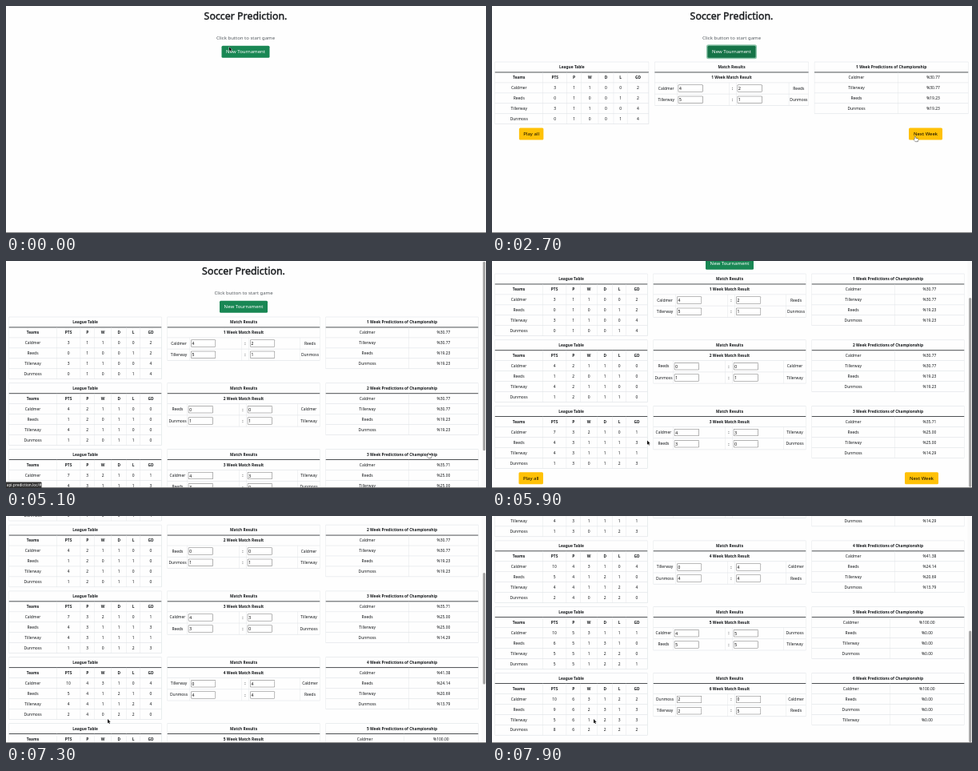
An HTML page with a canvas for the animation above (8000 ms loop, 600x284 px).

```html
<!DOCTYPE html>
<html lang="en">
<head>
<meta charset="utf-8">
<title>Soccer Prediction</title>
<style>
html, body { margin: 0; width: 100%; height: 100%; overflow: hidden; background: #fefefe; }
canvas { display: block; width: 600px; height: 284px; }
</style>
</head>
<body>
<canvas id="stage"></canvas>
<script>
const WIDTH = 600, HEIGHT = 284, VIEW = 283, LOOP = 8000;
const ROW = 12.95, WEEK_PITCH = 82.8, TABLE_TOP = 70;
const INK = '#212529', LINE = '#dee2e6';

const canvas = document.getElementById('stage');
const ctx = canvas.getContext('2d');
const dpr = window.devicePixelRatio || 1;
canvas.width = WIDTH * dpr;
canvas.height = HEIGHT * dpr;

const TEAMS = { C: 'Caldmer', R: 'Reeds', T: 'Tillerway', D: 'Dunmoss' };
const RESULTS = ['C42R T51D', 'R00C D11T', 'C43T R30D', 'T04C D44R', 'C45D R55T', 'D20C T25R'];
const HEADINGS = ['Teams', 'PTS', 'P', 'W', 'D', 'L', 'GD'];

// Play the whole season to obtain standings and title odds for each week.
function playSeason() {
  const table = Object.keys(TEAMS).map(id => ({ id, pts: 0, p: 0, w: 0, d: 0, l: 0, gd: 0 }));
  const record = (id, diff) => {
    const s = table.find(row => row.id === id);
    s.p++;
    s.gd = Math.abs(diff);
    if (diff > 0) { s.w++; s.pts += 3; }
    else if (diff < 0) s.l++;
    else { s.d++; s.pts++; }
  };
  return RESULTS.map((line, i) => {
    const matches = line.split(' ').map(([home, a, b, away]) => ({ home, a, b, away }));
    for (const m of matches) {
      record(m.home, m.a - m.b);
      record(m.away, m.b - m.a);
    }
    const left = 5 - i;
    const total = table.reduce((sum, s) => sum + s.pts + left, 0);
    const odds = [...table].sort((x, y) => y.pts - x.pts).map((s, rank) => {
      const chance = left < 2 ? (rank ? 0 : 100) : 100 * (s.pts + left) / total;
      return [TEAMS[s.id], '%' + chance.toFixed(2)];
    });
    const stats = table.map(s => [TEAMS[s.id], s.pts, s.p, s.w, s.d, s.l, s.gd]);
    return { matches, odds, stats };
  });
}
const season = playSeason();

// Glyphs are set large and scaled down so advances stay fractional.
const font = (size, weight) => `${weight} ${size * 10}px "Noto Sans", "Open Sans", sans-serif`;
function text(str, x, y, size = 4.95, { weight = 400, color = '#16191c', align = 'center', outline = 0 } = {}) {
  ctx.save();
  ctx.translate(x, y + size * 0.357);
  ctx.scale(0.1, 0.1);
  ctx.font = font(size, weight);
  ctx.textAlign = align;
  ctx.fillStyle = ctx.strokeStyle = color;
  ctx.fillText(str, 0, 0);
  if (outline) {
    ctx.lineWidth = outline * 10;
    ctx.strokeText(str, 0, 0);
  }
  ctx.restore();
}
const bold = (str, x, y) => text(str, x, y, 4.85, { weight: 700 });

// Columns share the table width in proportion to their widest cell.
function columnShares() {
  const measure = (str, size, weight) => {
    ctx.font = font(size, weight);
    return ctx.measureText(str).width / 10;
  };
  const widest = Math.max(...Object.values(TEAMS).map(name => measure(name, 4.95, 400)));
  const widths = HEADINGS.map((head, c) => 5 + (c ? measure(head, 4.85, 700) : widest));
  const total = widths.reduce((a, b) => a + b);
  return widths.map(w => w / total);
}
const shares = columnShares();

// Eased moves towards successive stops: [start, end, ...values].
function follow(origin, stops, t) {
  return stops.reduce((now, [start, end, ...goal]) => {
    const k = Math.min(1, Math.max(0, (t - start) / (end - start)));
    const eased = k * k * (3 - 2 * k);
    return now.map((v, i) => v + (goal[i] - v) * eased);
  }, origin);
}
const moveTo = (arrival, x, y, duration = 250) => [arrival - duration, arrival, x, y];
const POINTER = [
  moveTo(700, 322, 58, 700), moveTo(1500, 296.5, 97), moveTo(1900, 346, 135), moveTo(2300, 479, 166),
  moveTo(2600, 527, 163), moveTo(3700, 452, 181), moveTo(4300, 505, 227), moveTo(4800, 526, 240),
  moveTo(5900, 194, 224.5), moveTo(6200, 85.5, 273), moveTo(6500, 56, 268), moveTo(7200, 127, 254)
];
const SCROLL = [[5300, 5600, 54], [6650, 6700, 0], [6850, 7550, 200], [7600, 7900, 287.5]];
const WEEK_STARTS = [[1000, 1], [3000, 2], [4900, 3], [6700, 6]];
const HOVERS = [[0, 1400], [2600, 3400], [4700, 5300], [6400, 6800]];
const hovering = t => HOVERS.some(([from, to]) => t >= from && t < to);

function rect(x, y, w, h, color) {
  ctx.fillStyle = color;
  ctx.fillRect(x, y, w, h);
}
function rounded(x, y, w, h, r, fill) {
  ctx.beginPath();
  ctx.roundRect(x, y, w, h, r);
  ctx.fillStyle = fill;
  ctx.fill();
}
const hline = (x1, x2, y, color = LINE, size = 0.6) => rect(x1, y - size / 2, x2 - x1, size, color);
const vline = (x, y1, y2) => rect(x - 0.2, y1, 0.4, y2 - y1, LINE);

function button(label, cx, y, w, fill, color) {
  rounded(cx - w / 2, y, w, 15, 1.5, fill);
  text(label, cx, y + 7.4, 6, { color });
}

function frame(x, top, w, bottom, title) {
  hline(x, x + w, top);
  vline(x, top, bottom);
  vline(x + w, top, bottom);
  bold(title, x + w / 2, top + ROW / 2);
  hline(x, x + w, top + ROW, INK, 0.8);
}

function leagueTable(x, top, w, stats) {
  const bottom = top + 6 * ROW;
  frame(x, top, w, bottom, 'League Table');
  const rows = [HEADINGS, ...stats];
  const rowY = r => top + (r + 1.5) * ROW;
  rows.forEach((_, r) => hline(x, x + w, rowY(r) + ROW / 2));
  let edge = x;
  shares.forEach((share, c) => {
    const cell = share * w;
    rows.forEach((row, r) => (r ? text : bold)(String(row[c]), edge + cell / 2, rowY(r)));
    edge += cell;
    vline(edge, top + ROW, bottom);
  });
}

function scoreBox(x, y, value) {
  rounded(x, y - 4.5, 31, 9, 0.8, '#767676');
  rounded(x + 0.5, y - 4, 30, 8, 0.5, '#fff');
  text(value, x + 1.4, y + 0.2, 5, { align: 'left', color: '#000' });
}

function matchTable(x, top, w, week, matches) {
  const start = top + 2 * ROW, pitch = 14.2, bottom = start + 2 * pitch;
  const longHome = matches.some(m => m.home === 'T');
  const homeEdge = x + (longHome ? 27.8 : 24.6);
  const awayEdge = x + w - (longHome ? 24.5 : 27.5);
  frame(x, top, w, bottom, 'Match Results');
  bold(`${week} Week Match Result`, x + w / 2, top + 1.5 * ROW);
  hline(x, x + w, start);
  matches.forEach((m, i) => {
    const y = start + (i + 0.5) * pitch;
    text(TEAMS[m.home], (x + homeEdge) / 2 + 0.4, y - 0.2);
    scoreBox(homeEdge + 1.5, y, m.a);
    bold(':', homeEdge + 69.5, y);
    scoreBox(homeEdge + 75.5, y, m.b);
    text(TEAMS[m.away], (awayEdge + x + w) / 2, y - 0.2);
    hline(x, x + w, y + pitch / 2);
  });
  [homeEdge, homeEdge + 65, homeEdge + 74, awayEdge].forEach(e => vline(e, start, bottom));
}

function oddsTable(x, top, w, week, odds) {
  const bottom = top + 5 * ROW;
  const split = x + w * (week < 5 ? 0.545 : 0.513);
  frame(x, top, w, bottom, `${week} Week Predictions of Championship`);
  odds.forEach(([name, chance], r) => {
    const y = top + (r + 1.5) * ROW;
    text(name, (x + split) / 2, y);
    text(chance, (split + x + w) / 2, y);
    hline(x, x + w, y + ROW / 2);
  });
  vline(split, top + ROW, bottom);
}

function page(t, weeks, w) {
  const mid = w / 2, focused = t >= 900 && t < 2900;
  text('Soccer Prediction.', mid, 12.7, 12.4, { outline: 0.4 });
  text('Click button to start game', mid, 40, 6, { color: '#555b60' });
  if (focused) rounded(mid - 31.5, 48.3, 63, 18, 2.5, '#8cc3a9');
  button('New Tournament', mid, 49.8, 60, t >= 100 && t < 2900 ? '#157347' : '#198754', '#fff');

  const col = w / 3, pad = 3.75, inner = col - 2 * pad;
  season.slice(0, weeks).forEach(({ matches, odds, stats }, i) => {
    const top = TABLE_TOP + i * WEEK_PITCH;
    leagueTable(pad, top, inner, stats);
    matchTable(col + pad, top, inner, i + 1, matches);
    oddsTable(2 * col + pad, top, inner, i + 1, odds);
  });
  if (weeks > 0 && weeks < 6) {
    const y = TABLE_TOP + weeks * WEEK_PITCH - 0.2;
    button('Play all', w / 12 - 0.8, y, 30.5, '#ffc107', '#000');
    button('Next Week', w - 57, y, 42, '#ffc107', '#000');
  }
}

function scrollbar(scroll, docHeight) {
  rect(594.6, 0, 5.4, VIEW, '#fafafa');
  const size = VIEW * VIEW / docHeight;
  rounded(596.2, scroll / docHeight * VIEW + 0.7, 3, size - 1, 1.5, '#a2a2a2');
}

const ARROW = new Path2D('M0 0V6.4L1.5 5.1 2.6 7.4 3.6 6.9 2.5 4.7 4.5 4.6Z');
const HAND = new Path2D('M1.4 .5Q2.3 -.2 2.6 .7V2.5L5.2 3Q6 3.2 5.8 4.2L5.2 6.6H2.2L.2 4.2Q.2 3.3 1.4 3.8Z');
function pointer(x, y, hand) {
  ctx.save();
  ctx.translate(x, y);
  if (!hand) ctx.scale(0.82, 0.82);
  ctx.lineJoin = 'round';
  ctx.lineWidth = 0.8;
  ctx.strokeStyle = hand ? '#111' : '#fff';
  ctx.fillStyle = hand ? '#fff' : '#111';
  const shape = hand ? HAND : ARROW;
  ctx.stroke(shape);
  ctx.fill(shape);
  ctx.restore();
}

function draw(t) {
  const weeks = WEEK_STARTS.reduce((n, [at, count]) => t >= at ? count : n, 0);
  const [scroll] = follow([0], SCROLL, t);
  const overflow = weeks > 2;
  ctx.setTransform(dpr, 0, 0, dpr, 0, 0);
  rect(0, 0, WIDTH, HEIGHT, '#fefefe');

  ctx.save();
  ctx.translate(0, -scroll);
  page(t, weeks, overflow ? 594 : 599);
  ctx.restore();

  if (overflow) scrollbar(scroll, weeks === 3 ? 337 : 570);
  rect(0, VIEW, WIDTH, 1, '#858585');
  // The link preview trails the pointer slightly.
  if (hovering(t - 150)) {
    rounded(0, 276.5, 44.5, 7.5, [0, 1, 0, 0], '#333');
    text('api.prediction.loc/#', 0.7, 280.4, 4.8, { color: '#fff', align: 'left' });
  }
  const [x, y] = follow([279, 51], POINTER, t);
  pointer(x, y, t > 0 && hovering(t));
}

function tick() {
  draw(Math.floor(performance.now() % LOOP / 100) * 100);
  requestAnimationFrame(tick);
}
tick();
</script>
</body>
</html>
```
